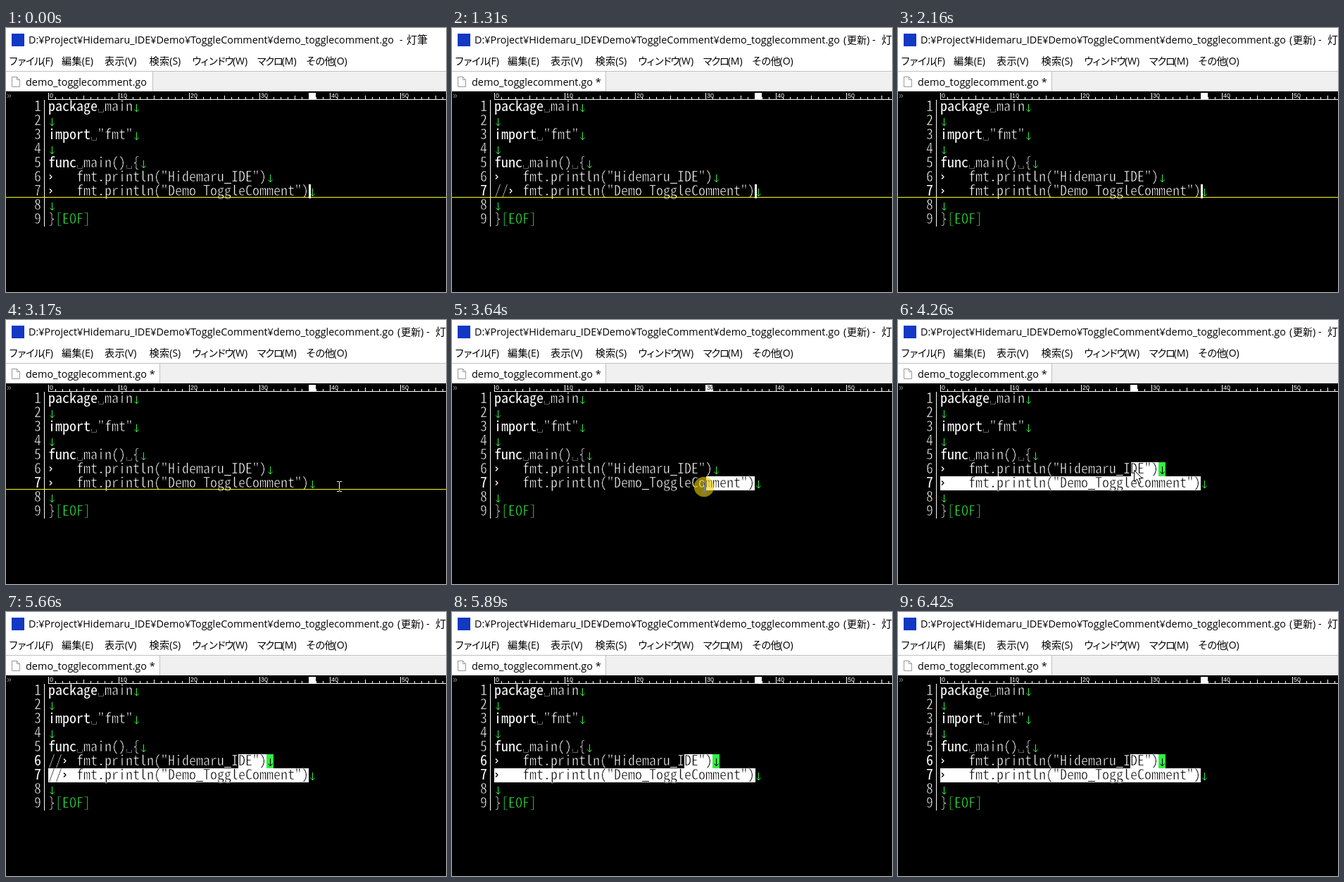
Animation, 625 px wide and 375 px high, one loop 6650 ms. Source, as an HTML page with a canvas:

```html
<!DOCTYPE html>
<html lang="ja">
<head>
<meta charset="utf-8">
<title>Toggle comment</title>
<style>
html, body { margin: 0; width: 100%; height: 100%; overflow: hidden; background: #000; }
canvas { display: block; }
</style>
</head>
<body>
<canvas id="stage" width="625" height="375"></canvas>
<script>
const ctx = document.getElementById("stage").getContext("2d");
const LOOP = 6650, LEFT = 60, TOP = 102, CELL = 10, ROW = 20, END_COL = 37;
const GREEN = "#30f040", TEXT = "#fff", CURSOR_LINE = "#ffff00";
const UI = '"Open Sans", "Noto Sans CJK JP", sans-serif';
const JP = '"Noto Sans CJK JP", "Noto Sans CJK", sans-serif';
const MONO = '"Noto Sans Mono CJK JP", "Noto Sans Mono", monospace';
const RULER_FONT = '9px "Liberation Sans", sans-serif';

// Half-width glyphs fill one 10 px cell.
ctx.font = `20px ${MONO}`;
const codeFont = `${Math.min(20, 200 / ctx.measureText("0").width)}px ${MONO}`;
ctx.lineJoin = "round";

const blinks = [150, 700, 1860, 2160, 2710, 3310, 4810, 5110, 5660, 5890, 6420];
// time, x, y of the pointer
const moves = [
  [3010, 520, 236], [3100, 490, 236], [3170, 473, 236], [3240, 452, 236],
  [3310, 434, 237], [3380, 426, 237], [3450, 408, 237], [3550, 382, 237],
  [3640, 358, 237], [3710, 347, 235], [3880, 340, 228], [3950, 336, 218],
  [4030, 333, 212]
];
// label, access key, x, letter spacing
const menus = [
  ["ファイル", "(F)", 3.5, -2.2], ["編集", "(E)", 79, 0.2], ["表示", "(V)", 140, 0.2],
  ["検索", "(S)", 203.5, 0.2], ["ウィンドウ", "(W)", 264, -2.6],
  ["マクロ", "(M)", 356, -2.3], ["その他", "(O)", 426, -1]
];

function rect(x, y, w, h, color) {
  ctx.fillStyle = color;
  ctx.fillRect(x, y, w, h);
}

function text(str, x, y, font, color = "#000", spacing = 0) {
  ctx.font = font;
  ctx.fillStyle = color;
  ctx.letterSpacing = spacing + "px";
  ctx.fillText(str, x, y);
  const width = ctx.measureText(str).width;
  ctx.letterSpacing = "0px";
  return x + width;
}

function line(points, color, width = 1) {
  ctx.strokeStyle = color;
  ctx.lineWidth = width;
  ctx.beginPath();
  points.forEach(([x, y], i) => i ? ctx.lineTo(x, y) : ctx.moveTo(x, y));
  ctx.stroke();
}

function inverted(paint) {
  ctx.globalCompositeOperation = "difference";
  paint();
  ctx.globalCompositeOperation = "source-over";
}

function stateAt(t) {
  const on = blinks.filter(b => b <= t).length % 2 === 0;
  const pointer = t < 5110 ? moves.filter(m => m[0] <= t).pop() : null;
  const within = (a, b) => t >= a && t < b;
  const state = {
    on, pointer, row: 7, col: END_COL,
    modified: t >= 1310,
    bold6: t >= 5110, bold7: t >= 1230,
    comment6: within(5110, 5890),
    comment7: within(1230, 2160) || within(5110, 5890),
    pressed: within(3310, 4260), arrow: within(4260, 5110),
    sel6: null, sel7: null
  };
  if (t >= 3310) {
    const [, x, y] = pointer || moves[moves.length - 1];
    const col = Math.min(END_COL, Math.round((x - LEFT) / CELL));
    const onSix = y < TOP + 6 * ROW;
    if (onSix) state.sel6 = [col, 32];
    state.sel7 = [onSix ? 0 : col, END_COL];
    if (state.sel7[0] === END_COL) state.sel7 = null;
    if (t < 5110) {
      state.row = onSix ? 6 : 7;
      state.col = col;
    }
  }
  return state;
}

function drawWindow(s) {
  rect(0, 0, 625, 61, "#fff");
  rect(8, 8, 18, 18, "#1238c4");
  const path = "D:¥Project¥Hidemaru_IDE¥Demo¥ToggleComment¥demo_togglecomment.go";
  text(path, 32, 22, `14.37px ${UI}`);
  if (s.modified) {
    text("(", 556, 22, `14.3px ${UI}`);
    text("更新", 561, 22, `14px ${JP}`);
    text(") -", 589, 22, `14.3px ${UI}`);
    text("灯", 610, 22, `15px ${JP}`);
  } else {
    text("-", 559, 22, `14.3px ${UI}`);
    text("灯筆", 569, 22, `15px ${JP}`);
  }
  for (const [label, key, x, spacing] of menus) {
    const end = text(label, x, 52, `14.2px ${JP}`, "#000", spacing);
    text(key, end, 52, `14px ${UI}`);
  }

  const tab = s.modified ? 218 : 208;
  rect(0, 61, 625, 29, "#f0f0f0");
  rect(0, 61, 625, 1, "#c0c0c0");
  rect(0, 62, tab, 28, "#fff");
  rect(tab, 62, 1, 28, "#c0c0c0");
  line([[8.5, 69.5], [15.5, 69.5], [19.5, 73.5], [19.5, 83.5], [8.5, 83.5], [8.5, 69]], "#999");
  line([[15.5, 69.5], [15.5, 73.5], [19.5, 73.5]], "#999");
  text("demo_togglecomment.go" + (s.modified ? " *" : ""), 28, 82, `14.45px ${UI}`);
}

function drawRuler(col) {
  text("»", 1, 100, '12px "Liberation Sans", sans-serif', "#888");
  rect(LEFT, 101, 565, 1, "#fff");
  for (let i = 0; i < 57; i++) {
    const x = LEFT + i * CELL;
    const h = i % 10 === 0 ? 9 : i % 5 === 0 ? 5 : 3;
    rect(x, 101 - h, 1, h, "#fff");
    if (i === col) rect(x, 92, CELL, 10, "#fff");
    if (i % 10 === 0) text(String(i), x + 2, 99, RULER_FONT, i === col ? "#000" : "#fff");
  }
}

// A stroke in the background colour pares the letter down to a hairline.
function drawLetter(ch, x, y, color, back, bold) {
  ctx.textAlign = "center";
  text(ch, x + 5, y + 16, codeFont, color);
  if (!bold) {
    ctx.strokeStyle = back;
    ctx.lineWidth = 0.6;
    ctx.strokeText(ch, x + 5, y + 16);
  }
  ctx.textAlign = "left";
}

function drawGlyph(ch, x, y, color, back, bold) {
  if (ch === "↓") {
    line([[x + 5.5, y + 6], [x + 5.5, y + 17]], color);
    line([[x + 2.5, y + 13.5], [x + 5.5, y + 17], [x + 8.5, y + 13.5]], color);
  } else if (ch === "␣") {
    ctx.setLineDash([1, 1]);
    line([[x + 1.5, y + 13], [x + 1.5, y + 17.5], [x + 8.5, y + 17.5], [x + 8.5, y + 13]], "#bbb");
    ctx.setLineDash([]);
  } else if (ch === "›") {
    line([[x + 2, y + 6.5], [x + 5, y + 9.5], [x + 2, y + 12.5]], color, 1.3);
  } else if (ch === "_") {
    rect(x, y + 18, CELL, 1, color);
  } else {
    drawLetter(ch, x, y, color, back, bold);
  }
}

function drawLine(number, code, { sel = null, bold = false, keyword = 0, greenFrom = 99 } = {}) {
  const y = TOP + (number - 1) * ROW;
  drawLetter(String(number), 40, y, TEXT, "#000", bold);
  [...code].forEach((ch, i) => {
    const x = LEFT + i * CELL;
    const color = ch === "↓" || i >= greenFrom ? GREEN : TEXT;
    const chosen = sel && i >= sel[0] && i < sel[1];
    if (chosen) rect(x, y, CELL, ROW, color);
    drawGlyph(ch, x, y, chosen ? "#000" : color, chosen ? color : "#000", i < keyword);
  });
}

function drawCode(s) {
  const print = (arg, comment) => `${comment ? "//› " : "›   "}fmt.println("${arg}")↓`;
  rect(54, 102, 1, 180, "#fff");
  drawLine(1, "package␣main↓", { keyword: 7 });
  drawLine(2, "↓");
  drawLine(3, 'import␣"fmt"↓', { keyword: 6 });
  drawLine(4, "↓");
  drawLine(5, "func␣main()␣{↓", { keyword: 4 });
  drawLine(6, print("Hidemaru_IDE", s.comment6), { sel: s.sel6, bold: s.bold6 });
  drawLine(7, print("Demo_ToggleComment", s.comment7), { sel: s.sel7, bold: s.bold7 });
  drawLine(8, "↓");
  drawLine(9, "}[EOF]", { greenFrom: 1 });

  if (!s.sel7) rect(0, 240, 625, 1, CURSOR_LINE);
  if (s.on) {
    const x = LEFT + s.col * CELL, y = TOP + (s.row - 1) * ROW;
    if (s.sel7) inverted(() => rect(x, y, 1, ROW, "#fff"));
    else rect(x, y, 3, ROW, "#fff");
  }
}

function drawPointer(s) {
  if (!s.pointer) return;
  const [, x, y] = s.pointer;
  if (s.arrow) {
    const shape = [[0, 0], [0, 16], [4, 12.5], [7, 18.5], [9.5, 17.3], [6.8, 11.5], [11.5, 11.5]];
    ctx.beginPath();
    shape.forEach(([dx, dy]) => ctx.lineTo(x + 2.5 + dx, y + 1.5 + dy));
    ctx.closePath();
    ctx.fillStyle = "#fff";
    ctx.fill();
    ctx.strokeStyle = "#000";
    ctx.lineWidth = 1;
    ctx.stroke();
    return;
  }
  if (s.pressed) {
    ctx.fillStyle = "rgba(240,210,0,.6)";
    ctx.beginPath();
    ctx.arc(x, y, 14.3, 0, Math.PI * 2);
    ctx.fill();
  }
  inverted(() => {
    rect(x, y - 6, 1, 13, "#fff");
    for (const dy of [-7, 7]) {
      rect(x - 3, y + dy, 3, 1, "#fff");
      rect(x + 1, y + dy, 3, 1, "#fff");
    }
  });
}

function frame() {
  const s = stateAt(performance.now() % LOOP);
  rect(0, 0, 625, 375, "#000");
  drawWindow(s);
  drawRuler(s.col);
  drawCode(s);
  drawPointer(s);
  requestAnimationFrame(frame);
}
frame();
</script>
</body>
</html>
```
